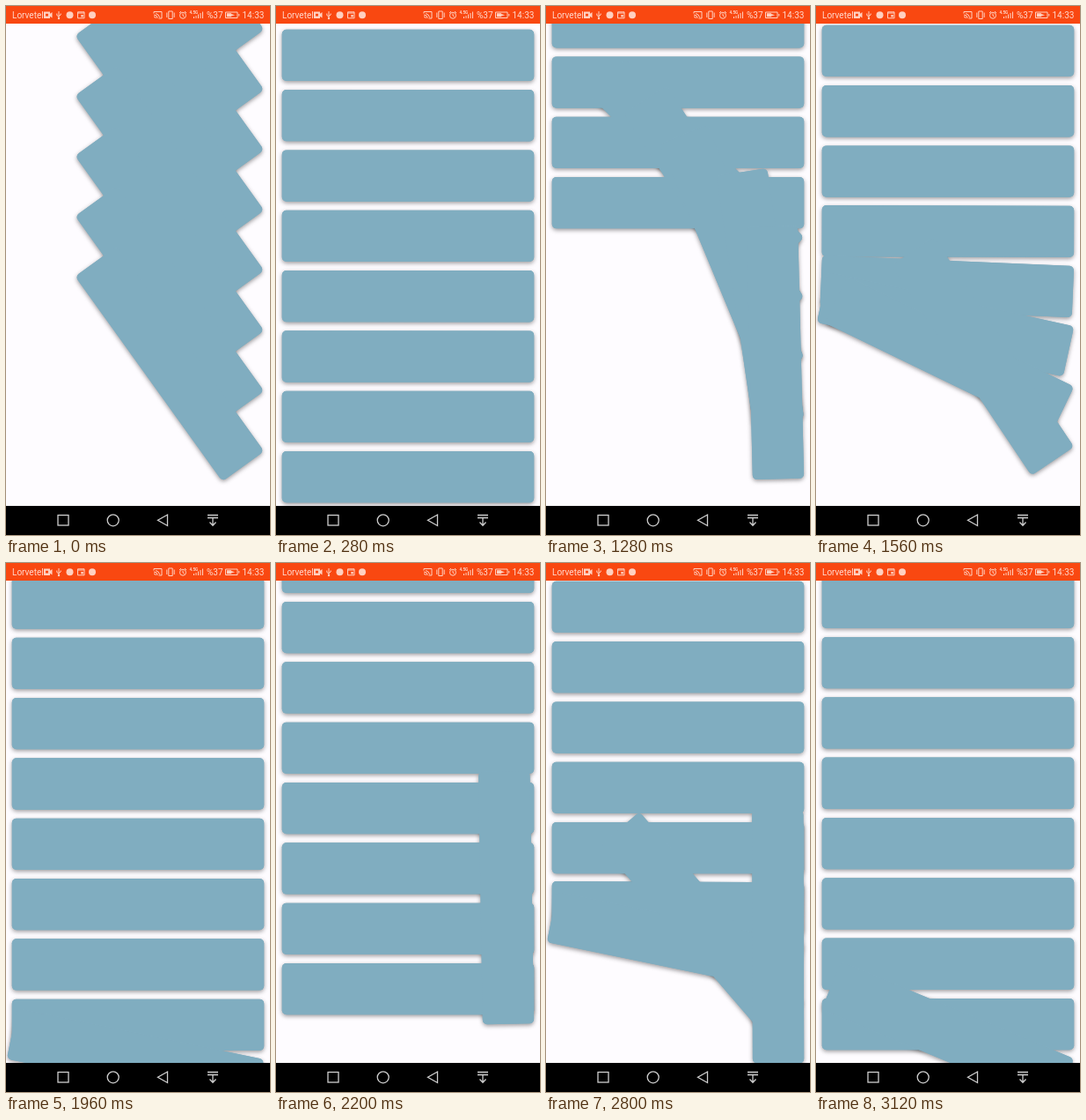
Animation, 300 px wide and 600 px high, one loop 3160 ms. Source, as an HTML page with a canvas:

```html
<!DOCTYPE html>
<html>
<head>
<meta charset="utf-8">
<style>
  html, body { margin: 0; width: 100%; height: 100%; overflow: hidden; background: #fefcff; }
  canvas, svg { position: absolute; left: 0; top: 0; width: 300px; height: 600px; }
  text { font-family: Roboto, sans-serif; font-size: 10px; fill: #ffd9cd; }
  .line { fill: none; stroke: #ffd0c0; stroke-width: 1; }
  .solid { fill: #ffd0c0; }
  .nav { fill: none; stroke: #cfcfcf; stroke-width: 1.3; }
</style>
</head>
<body>
<canvas id="list" width="300" height="600"></canvas>
<svg viewBox="0 0 300 600">
  <rect width="300" height="20" fill="#f94811"/>
  <text x="7" y="14">Lorvetel</text>
  <!-- camera, usb, two app badges, calendar -->
  <path class="solid" fill-rule="evenodd" d="M43 6.5h7v2.2l2.5-1.7v6.500l-2.500-1.700v2.200h-7zM45 8.800v2.700h3v-2.700z"/>
  <path class="line" d="M60 6v8M57.800 8.500v2l2.200 1.500M62.200 8.500v1.500l-2.200 1.500"/>
  <circle class="solid" cx="60" cy="14" r="1.200"/>
  <circle class="solid" cx="72.500" cy="10.300" r="4"/>
  <path class="line" d="M81.500 6.800h7.500v7h-7.500zM81.500 8h7.500"/>
  <rect class="solid" x="85.300" y="10" width="2.500" height="2.500"/>
  <circle class="solid" cx="98" cy="10.300" r="4"/>
  <!-- cast, vibrate, alarm, signal, battery -->
  <path class="line" d="M168 8.500v-2h9v7.500h-3.500M168 10a4 4 0 0 1 4 4M168 12a2 2 0 0 1 2 2M170 8.500a5.500 5.500 0 0 1 4.500 4.500"/>
  <path class="line" d="M184.800 6h4.400v8.500h-4.400zM182.800 7.500v5.500M191.200 7.500v5.500"/>
  <circle class="line" cx="201" cy="10.700" r="3.500"/>
  <path class="line" d="M201 8.500v2.500l1.500 1M197 8l2-2M205 8l-2-2"/>
  <text x="208.500" y="9" style="font-size:4.500px;font-weight:700">4.5G</text>
  <path class="line" d="M213.500 14v-2M216 14v-3M218.500 14v-4.500M221 14v-6M223.500 14v-7.500"/>
  <text x="228" y="14">%37</text>
  <path class="line" d="M249.500 7h13.500v6.500h-13.500zM264.800 9v2.500"/>
  <path class="solid" d="M251 8.300h5v4h-5zM256 9l4 1.300-4 1.300z"/>
  <text x="268.500" y="14">14:33</text>

  <rect y="567" width="300" height="33" fill="#000"/>
  <rect class="nav" x="59" y="577.500" width="12" height="11.500"/>
  <circle class="nav" cx="121.700" cy="583.300" r="6.500"/>
  <path class="nav" d="M183.500 577v12.500l-11-6.200z"/>
  <path class="nav" d="M229 577.500h12M229 580.500h12M235 580.500v8.500M231.500 585.500l3.500 3.700 3.500-3.700"/>
</svg>
<script>
const LOOP = 3160, STEP = 40, SPIN = 500;
const PITCH = 68.33, FIRST = 573.4, RIGHT = 293.2, W = 286.4, H = 58.3;
const ctx = document.getElementById('list').getContext('2d');

// When each row below the first eight enters and begins to swing in
const starts = [1030, 1073, 1113, 1181, 1240, 1350, 1577, 2167, 2232, 2317, 2417, 2565, 2787];

// [time, scroll]: a row enters each time the list has moved by one pitch
const keys = starts.map((t, i) => [t - 10, 5.5 + PITCH * i]).concat([
  [0, 0], [1010, 0], [1280, 311], [1720, 420.4], [2070, 420.4],
  [2400, 685.4], [2800, 826], [2960, 831.1], [LOOP, 831.1]
]).sort((a, b) => a[0] - b[0]);

const slope = i => (keys[i + 1][1] - keys[i][1]) / (keys[i + 1][0] - keys[i][0]);

function tangent(i) {
  if (i < 1 || i > keys.length - 2) return 0;
  const a = slope(i - 1), b = slope(i);
  return a * b > 0 ? 2 * a * b / (a + b) : 0;
}

// Monotone cubic through the keys
function scrollAt(t) {
  let i = 0;
  while (i < keys.length - 2 && keys[i + 1][0] <= t) i++;
  const [t0, y0] = keys[i], [t1, y1] = keys[i + 1];
  const d = t1 - t0, u = (t - t0) / d, v = 1 - u;
  return y0 * v * v * (1 + 2 * u) + y1 * u * u * (3 - 2 * u)
    + d * u * v * (tangent(i) * v - tangent(i + 1) * u);
}

function angleAt(age) {
  return Math.PI / 4 * (1 + Math.cos(Math.PI * Math.min(1, age / SPIN)));
}

// The card turns about its top right corner
function drawCard(y, angle) {
  ctx.save();
  ctx.translate(RIGHT, y);
  ctx.rotate(angle);
  ctx.beginPath();
  ctx.roundRect(-W, 0, W, H, 5);
  ctx.fill();
  ctx.restore();
}

function draw(t) {
  const scroll = scrollAt(t), cards = [];
  for (let i = -8; i < starts.length; i++) {
    const age = t - (i < 0 ? -217 : starts[i]);
    const y = FIRST + PITCH * i - scroll;
    if (age >= 0 && y > -H) cards.push([y, angleAt(age)]);
  }
  ctx.fillStyle = '#fefcff';
  ctx.fillRect(0, 0, 300, 600);
  ctx.fillStyle = '#80adc0';
  // All shadows lie below all cards
  ctx.shadowColor = 'rgba(0,0,0,.4)';
  ctx.shadowBlur = 5;
  ctx.shadowOffsetY = 1.8;
  cards.forEach(c => drawCard(...c));
  ctx.shadowColor = 'transparent';
  cards.forEach(c => drawCard(...c));
}

const begin = performance.now();
function tick() {
  const t = (performance.now() - begin + 4) % LOOP;
  draw(Math.floor(t / STEP) * STEP);
  requestAnimationFrame(tick);
}
tick();
</script>
</body>
</html>
```
